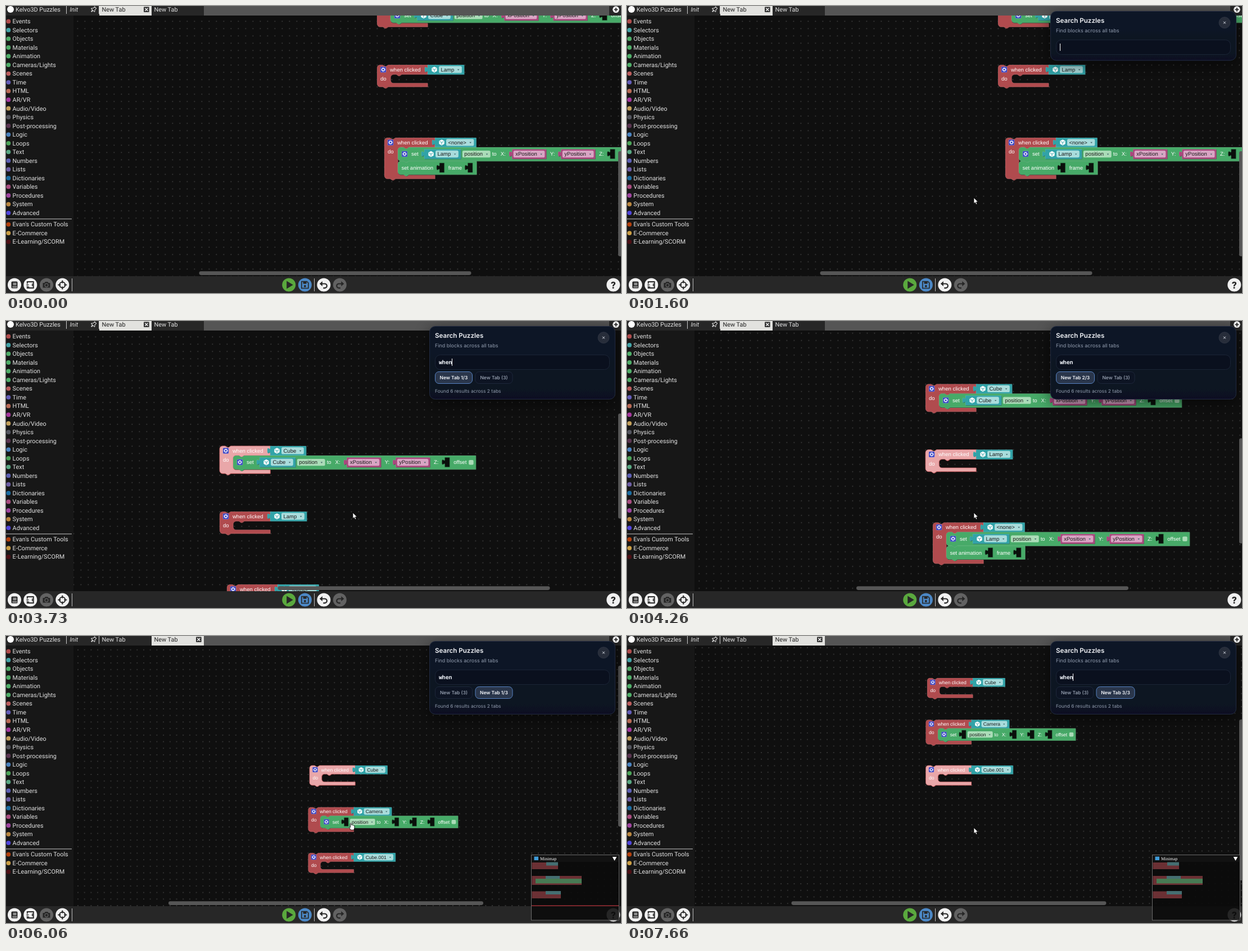
Recreate the animation shown at these times as an HTML page. Size 1094 by 512 pixels, loop 8000 ms.

```html
<!DOCTYPE html>
<html lang="en">
<head>
<meta charset="utf-8">
<title>Puzzle search</title>
<style>
html, body { margin: 0; width: 100%; height: 100%; overflow: hidden; background: #0f0f0f; }
svg { display: block; width: 100vw; height: 100vh; }
text { white-space: pre; text-rendering: geometricPrecision; }
.ui { font: 10.85px Roboto, sans-serif; fill: #e2e2e2; }
.blk { font: 9.53px "Liberation Sans", Arial, sans-serif; fill: #fff; }
.pane { font-family: Inter, sans-serif; }
.ink { fill: #1c1c1c; }
.body { stroke: #fff; stroke-opacity: .22; stroke-width: .5; }
.hot > .edge { fill: #b5484c; }
.hot > .body { fill: #e9a7a9; stroke: #cf6a6d; stroke-opacity: 1; stroke-width: .8; }
.hot > .call { fill: #faa294; stroke: #f0553c; }
</style>
</head>
<body>
<svg id="stage" viewBox="0 0 1094 512" preserveAspectRatio="none"></svg>
<script>
const RED = '#b04b4e', TEAL = '#31a3a8', GREEN = '#47aa68', PLUM = '#a9477d', DARK = '#272727';
const WORK = '#0f0f0f';

// Measured large so that hinting does not round the advances
const pen = document.createElement('canvas').getContext('2d');
pen.font = '953px "Liberation Sans", Arial, sans-serif';
const wide = s => pen.measureText(s).width / 100;

const rect = (x, y, w, h, fill, more = '') =>
  `<rect x="${x}" y="${y}" width="${w}" height="${h}" fill="${fill}" ${more}/>`;
const text = (x, y, s, more = '') =>
  `<text x="${x}" y="${y}" ${more}>${s.replace(/&/g, '&amp;').replace(/</g, '&lt;')}</text>`;
const disc = (x, y, r, fill, more = '') => `<circle cx="${x}" cy="${y}" r="${r}" fill="${fill}" ${more}/>`;
const path = (d, fill, more = '') => `<path d="${d}" fill="${fill}" ${more}/>`;
const line = (d, color, width, more = '') =>
  `<path d="${d}" fill="none" stroke="${color}" stroke-width="${width}" ${more}/>`;
const at = (x, y, body, more = '') => `<g transform="translate(${x} ${y})" ${more}>${body}</g>`;

// Puzzle blocks
const NOTCH = 'l3.9 2.6h2l3.9 -2.6';
const HCTON = 'l-3.9 2.6h-2l-3.9 -2.6';
const TOP = `M0 5.2A5.2 5.2 0 0 1 5.2 0H10${NOTCH}`;
const FOOT = `H19.8${HCTON}H5.2A5.2 5.2 0 0 1 0 `;
const HEAD = 16.9, EMPTY = 15.6, ARM = 6.5, GAP = .9;
const TALL = 24.7, SHORT = 24;

const shape = (d, fill, kind = '') =>
  path(d, fill, 'class="edge" transform="translate(.65 .65)"') +
  path(d, '#0006', 'transform="translate(.65 .65)"') +
  path(d, fill, `class="body ${kind}"`);

const plug = w =>
  `M${w} 0H0v3.25c0 6.5 -5.2 -5.2 -5.2 4.9s5.2 -1.6 5.2 4.9V${HEAD}H${w}Z`;

const gear = (x, y) => at(x, y,
  rect(-5, -5, 10, 10, '#3440c4', 'rx="1.5" stroke="#8d95e8" stroke-width=".5"') +
  disc(0, 0, 2.3, 'none', 'stroke="#fff" stroke-width="1.3"') +
  disc(0, 0, 3.3, 'none', 'stroke="#fff" stroke-width="1" stroke-dasharray="1.2 1.39"'));

const pill = (x, y, s, fill) => {
  const w = wide(s) + 17;
  return rect(x, y, w, 12.4, fill, 'rx="2.6"') + text(x + 3.5, y + 9.6, s, 'class="ink"') +
    path(`M${x + w - 8} ${y + 5.6}h3.6l-1.8 2.2Z`, '#3f6468');
};

const cubeIcon = path('M0 -5.2L4.7 -2.6V2.7L0 5.3L-4.7 2.7V-2.6Z', '#fff') +
  line('M-3.4 -1.7L0 .1L3.4 -1.7M0 .1V4', TEAL, 1);

const picker = (x, y, s) => {
  const w = wide(s) + 41;
  return { w, svg: at(x, y, shape(plug(w), TEAL) + at(12, 8.4, cubeIcon) + pill(20, 2.2, s, '#a9dcdc')) };
};
const variable = (x, y, s) => {
  const w = wide(s) + 22;
  return { w, svg: at(x, y, shape(plug(w), PLUM) + pill(2.5, 2.3, s, '#d9a5c4')) };
};
const slot = (x, y) => ({ w: 8.5, svg: at(x, y, path(plug(8.5), '#0a0f0b', 'stroke="#2c6b42" stroke-width=".6"')) });

const rowBox = (w, h, body) => ({ h, svg: shape(`${TOP}H${w}V${h}${FOOT}${h - 5.2}Z`, GREEN) + body });

function setRow(target, x1, y1) {
  let x = 24, out = gear(12, 12);
  const word = (s, gap) => { out += text(x, 15.6, s); x += wide(s) + gap; };
  const input = (make, s, gap) => { const b = make(x, 3.7, s); out += b.svg; x += b.w + gap; };
  word('set', 10.3);
  input(target ? picker : slot, target, 3);
  out += pill(x, 6, 'position', '#abdcb8');
  x += wide('position') + 20;
  word('to', 7);
  word('X:', 11.5);
  input(x1 ? variable : slot, x1, 7);
  word('Y:', 11);
  input(y1 ? variable : slot, y1, 7);
  word('Z:', 11.3);
  input(slot, '', 7);
  word('offset', 3.8);
  out += rect(x, 8, 8.5, 8.5, '#abdcb8', 'rx="2"');
  return rowBox(x + 12.5, target ? TALL : SHORT, out);
}

function animRow() {
  const a = 6.5 + wide('set animation') + 11, b = a + 15.5, c = b + wide('frame') + 10.5;
  return rowBox(c + 15.5, SHORT, text(6.5, 15.6, 'set animation') + slot(a, 3.5).svg +
    text(b, 15.6, 'frame') + slot(c, 3.5).svg);
}

function eventBlock(x, y, target, rows = [], scale = 1) {
  let m = HEAD, inside = '';
  for (const r of rows) {
    inside += at(24, m, r.svg);
    m += r.h;
  }
  m += rows.length ? GAP : EMPTY;
  const end = m + ARM, w = 90;
  const d = `${TOP}H${w}V${HEAD}H43.8${HCTON}H29.2a5.2 5.2 0 0 0 -5.2 5.2V${m - 5.2}` +
    `a5.2 5.2 0 0 0 5.2 5.2H${w}V${end}${FOOT}${end - 5.2}Z`;
  const inner = shape(d, RED) + gear(11, 8.4) + text(23, 11.7, 'when clicked') + text(6, 28.2, 'do') +
    picker(w, 0, target).svg + inside;
  return `<g class="item" transform="translate(${x} ${y}) scale(${scale})">${inner}</g>`;
}

function callBlock(x, y, s, fill) {
  const w = wide(s) + 13;
  return at(x, y, shape(`M0 3A3 3 0 0 1 3 0H10${NOTCH}H${w}V${HEAD}H19.8${HCTON}H3A3 3 0 0 1 0 14Z`, fill, 'call') +
    text(6, 12, s), 'class="item"');
}

const ORANGE = '#dc3503';
const worlds = [
  callBlock(-101, -115, 'Add Minimap', ORANGE) +
  callBlock(-88.5, -76, 'Improved Search (Per Tab Navigation, Clean & Fix...', ORANGE) +
  callBlock(-101, -37, 'Add Delete & Duplicate Shortcut', ORANGE) +
  callBlock(-101, 2, 'Add Menu', ORANGE) +
  callBlock(-114.5, 41, 'Enable Math Expression Input (Shift+C)', '#4787e2') +
  eventBlock(380, 223, 'Cube', [setRow('Cube', 'xPosition', 'yPosition')]) +
  eventBlock(380, 340, 'Lamp') +
  eventBlock(393, 470, '<none>', [setRow('Lamp', 'xPosition', 'yPosition'), animRow()]),
  eventBlock(540, 231, 'Cube', [], .9) +
  eventBlock(537.5, 305.5, 'Camera', [setRow()], .9) +
  eventBlock(537.5, 387, 'Cube.001', [], .9)
];

// Sidebar and bars
const topics = `Events b04c4c,Selectors 43a5a8,Objects 4fae68,Materials 4fae68,Animation 4fae68,Cameras/Lights 4fae68,
Scenes bb5c5c,Time 635db8,HTML b96a55,AR/VR a6389e,Audio/Video c3a05a,Physics 54565f,Post-processing 5a3550,
Logic 4a83c0,Loops 4ca458,Text 58a882,Numbers 5d60b5,Lists 6e5fa6,Dictionaries 1b6ea3,Variables a94d80,
Procedures a045a0,System b9863f,Advanced 5045dc,Evan's Custom Tools b3400d,E-Commerce cc9f44,E-Learning/SCORM 4d0f14`
  .split(/,\s*/).map(s => s.match(/(.*) (\w+)$/));

const sidebar = rect(0, 17, 120, 465, '#171717') + topics.map(([, name, color], i) => {
  const y = 27.4 + i * 15.53 + (i > 22 ? 5 : 0);
  return disc(4.4, y, 3.9, '#' + color) + text(11.6, y + 3.8, name);
}).join('') + rect(0, 379.4, 117, 1, '#c8c8c8');

const topBar = rect(0, 0, 1094, 17, '#555') + rect(0, 0, 352, 17, DARK) + rect(1073, 0, 21, 17, DARK) +
  disc(8, 6, 6, '#fff') + text(17, 9.8, 'Kelvo3D Puzzles') + text(113.5, 9.8, 'Init', 'font-style="italic"') +
  rect(107, 0, 1, 14, '#ccc') + rect(165, 0, 1, 14, '#ccc') +
  at(156, 6, path('M-2 -4.5h4v3.6l2 2.2v.9h-3.4v3.3h-1.2v-3.3h-3.4v-.9l2 -2.2Z', 'none',
    'stroke="#ddd" stroke-width="1" transform="rotate(45)"')) +
  disc(1085, 6.3, 5.8, '#fff') + line('M1081.6 6.3h6.8M1085 2.9v6.8', DARK, 1.8);

const tab = x => `<g class="tab">${rect(x, 0, 93, 17, DARK)}${text(x + 4.5, 9.8, 'New Tab')}
  <g class="shut">${rect(x + 79, 1.4, 9.6, 9.6, '#333', 'rx="1"')}
  ${line(`M${x + 81.3} 3.7l5 5m0 -5l-5 5`, '#fff', 1.3)}</g></g>`;

const button = (x, fill, icon) => at(x, 497.5, disc(0, 0, 12, fill) + icon);
const K = DARK, W = '#f1f1f1', G = '#626262';
const back = line('M-4 -2H1.5a4 3.8 0 0 1 0 7.6H-1', K, 2.2) + path('M-7.5 -2l5 -4.6v9.2Z', K);
const bottomBar = rect(0, 482, 1094, 30, DARK) +
  button(15, W, rect(-5.5, -6, 11, 12, K, 'rx="1.5"') + rect(-2.5, -3.4, 6, 1.2, W) + rect(-2.5, -.8, 6, 1.2, W) + rect(-3.6, 3, 8, 1.2, W)) +
  button(43.3, W, line('M-5.5 -2V-5.5H5.5V5.5H-5.5V2', K, 1.8) + line('M-3 5.5v-3M3.5 -2.5v5M-7 0h4', K, 1.5)) +
  button(72, G, path('M-6.5 -3.5h3l1.2 -2h4.6l1.2 2h3v8.5h-13Z', K) + disc(0, .6, 3, K, `stroke="${G}" stroke-width="1.2"`)) +
  button(100.3, W, disc(0, 0, 5, 'none', `stroke="${K}" stroke-width="2"`) + line('M0 -8v5M0 8v-5M-8 0h5M8 0h-5', K, 2)) +
  rect(117, 486, 1, 23, '#bbb') +
  button(503.2, '#5aa83e', path('M-4 -7L7.5 0L-4 7Z', K)) +
  button(531.8, '#4c88c6', line('M-6 -6H3.5L6 -3.5V6H-6Z', K, 1.6) + rect(-3.2, -5.5, 6, 3.6, K) + disc(0, 2.2, 2, K)) +
  rect(548, 486, 1, 23, '#bbb') +
  button(565.3, W, back) +
  button(593.8, G, `<g transform="scale(-1 1)">${back}</g>`) +
  button(1080.3, W, text(0, 6.2, '?', `style="fill:${K};font-weight:900;font-size:17px" text-anchor="middle"`));

const panel = `<g id="panel" class="pane">
  <rect id="card" x="753.5" y="9.5" width="330" rx="10" fill="url(#navy)" stroke="#222c40" filter="url(#drop)"/>
  ${text(763, 29.8, 'Search Puzzles', 'font-size="11.6" font-weight="600" fill="#f3f5f9"')}
  ${text(763, 46.6, 'Find blocks across all tabs', 'font-size="9" fill="#929daf"')}
  ${disc(1063, 29.7, 10, '#272d3a', 'stroke="#353c4a" stroke-width=".7"')}
  ${line('M1061 27.7l4 4m0 -4l-4 4', '#d5dae2', 1)}
  ${rect(763.5, 60.5, 310, 26, '#0a101e', 'rx="9" stroke="#1b2436"')}
  <text id="query" x="770" y="77" font-size="9.75" font-weight="600" fill="#eef2f8" style="font-family:'Noto Sans Mono','DejaVu Sans Mono',monospace"></text>
  <rect id="caret" y="67" width="1" height="13" fill="#fff"/>
  <g id="found" font-size="8.45">
    ${[0, 1].map(() => '<g class="chip"><rect y="90.5" height="21" rx="6.5"/><text y="104.1" text-anchor="middle"></text></g>').join('')}
    <text id="count" x="763" y="128.2" fill="#929daf"></text>
  </g></g>`;

const mini = (y, w, h, tx, th) => rect(935.5, y, w, h, '#6b3034') + rect(tx, y - .5, 935.5 + w - tx, th, '#456e71');
const minimap = `<g id="mini">
  ${rect(934.5, 390.5, 156, 116.5, '#0b0b0b', 'fill-opacity=".88" stroke="#6a6a6a"')}
  ${rect(935, 391, 155, 12, '#121212')}
  ${rect(939.5, 393.5, 7.5, 6.5, '#3f9bd8')}
  ${text(950, 400, 'Minimap', 'style="font:8px \'Liberation Serif\',serif" fill="#fff"')}
  ${path('M1078.7 394h7.6l-3.8 7Z', '#fff')}
  ${mini(404, 46.5, 12, 961, 6)}
  ${rect(935.5, 428, 88.5, 16, '#6b3034') + rect(960, 428, 25, 6, '#456e71') + rect(942, 433, 82, 8.3, '#477a53')}
  ${mini(455.5, 51.5, 12.5, 960, 6)}
  <rect id="edge" x="935" y="480.5" width="155" height="1.4" fill="#a8323a"/></g>`;

const arrow = path('M0 0V10.4L2.4 8.2L4 12L5.8 11.2L4.2 7.6H7.4Z', '#fff', 'stroke="#000" stroke-width=".7"');
const hand = path('M-2 6.5L-4.8 2.2Q-4.6 .6 -2.8 2V-5Q-2 -6.8 -1 -5V-2.2Q0 -3.6 1 -2Q2 -3 2.9 -1.6Q4.3 -2.2 4.6 -.6V3L3.4 6.5Z',
  '#fff', 'stroke="#000" stroke-width=".8"');

document.getElementById('stage').innerHTML = `
<defs>
  <pattern id="grid" patternUnits="userSpaceOnUse"><rect id="dot" width="1.4" height="1.4" fill="#525252"/></pattern>
  <linearGradient id="navy" x2="0" y2="1"><stop stop-color="#101828"/><stop offset="1" stop-color="#0a1120"/></linearGradient>
  <filter id="drop" x="-20%" y="-40%" width="140%" height="200%"><feDropShadow dx="0" dy="7" stdDeviation="14" flood-color="#000" flood-opacity=".55"/></filter>
  <clipPath id="view"><rect x="120" y="17" width="974" height="465"/></clipPath>
</defs>
${rect(0, 0, 1094, 512, WORK)}
${rect(120, 17, 974, 465, 'url(#grid)')}
<g clip-path="url(#view)" class="blk">${worlds.map(w => `<g class="world">${w}</g>`).join('')}</g>
<rect id="hbar" y="473.3" height="6.6" rx="3.3" fill="#565656"/>
<rect id="vbar" x="1089" width="6.6" rx="3.3" fill="#565656"/>
<g class="ui">${sidebar}${topBar}${tab(166)}${tab(259)}${bottomBar}</g>
${panel}${minimap}
<g id="arrow">${arrow}</g><g id="hand" transform="translate(615.3 339.5)">${hand}</g>`;

// Timeline
const $ = id => document.getElementById(id);
const all = s => [...document.querySelectorAll(s)];
const set = (el, o) => { for (const k in o) el.setAttribute(k, o[k]); };
const show = (el, on) => { el.style.display = on ? '' : 'none'; };
const last = (list, t) => list.filter(e => e[0] <= t).pop();

// time, tab, shift x, shift y, lit block, hit number
const views = [
  [0, 0, 280, -235, -1, 0],
  [2200, 0, 676, 356, 0, 1],
  [2460, 0, 0, 0, 5, 1],
  [3860, 0, 151, -110.5, 6, 2],
  [4390, 0, -14, -258, 7, 3],
  [5520, 1, 0, 0, -1, 1],
  [5590, 1, 0, 0, 0, 1],
  [6460, 1, -62, -78.5, 1, 2],
  [7190, 1, -6, -156, 2, 3]
];
const scenes = [
  { step: 13, ox: 380.3, oy: 223.3, h0: 483.5, hk: .5, hw: 484, v0: 165, vk: .4, vh: 187.5 },
  { step: 11.7, ox: 537.5, oy: 305.5, h0: 289, hk: .58, hw: 560, v0: 53, vk: .615, vh: 287 }
];
const typed = [[0, ''], [2200, 'w'], [2460, 'wh'], [2530, 'whe'], [2660, 'when']];
const blinks = [1600, 2130, 2200, 3190, 3730, 4260, 4790, 5320, 5520, 6060, 6590, 7120, 7660];

const glide = (times, [x0, y0], [x1, y1], ease) => times.map((t, i) => {
  const k = ease(i / (times.length - 1));
  return [t, x0 + (x1 - x0) * k, y0 + (y1 - y0) * k];
});
const mouse = [
  ...glide([120, 190, 260, 330, 390, 460, 520], [1004, 493], [647, 375], k => 1 - (1 - k) ** 2),
  [660, 640, 367], [730, 647, 372],
  ...glide([930, 1000, 1130, 1200], [642, 367], [617, 342], k => k * (2 - k))
];

const worldEls = all('.world'), tabs = all('.tab'), chips = all('.chip');
const items = worldEls.map(w => [...w.children]);

function drawPanel(t, view, tabNow) {
  const query = last(typed, t)[1], hits = t < 2460 ? 8 : 3;
  show($('panel'), t >= 1600);
  show($('found'), query);
  $('card').setAttribute('height', query ? 130 : 87.5);
  $('query').textContent = query;
  $('caret').setAttribute('x', 770 + query.length * 5.85 - (query ? .4 : 0));
  show($('caret'), blinks.filter(b => b <= t).length % 2);
  $('count').textContent = `Found ${hits + 3} results across 2 tabs`;
  let x = 763.5;
  chips.forEach((chip, i) => {
    const on = i === tabNow, [box, label] = chip.children;
    const w = on && view[5] > 1 ? 68 : 66;
    set(box, { x, width: w, fill: on ? '#2a364b' : '#0d1423', stroke: on ? '#5783c4' : '#1d273a' });
    set(label, { x: x + w / 2, fill: on ? '#f4f7fb' : '#a2acbc', 'font-weight': on ? 600 : 500 });
    label.textContent = on ? `New Tab ${view[5]}/${hits}` : 'New Tab (3)';
    x += w + 5.5;
  });
}

function draw(t) {
  const view = last(views, t), [, now, dx, dy, lit] = view, s = scenes[now];
  worldEls.forEach((w, i) => {
    show(w, i === now);
    w.setAttribute('transform', `translate(${dx} ${dy})`);
    items[i].forEach((b, j) => b.classList.toggle('hot', i === now && j === lit));
  });
  const half = s.step / 2;
  set($('grid'), { x: s.ox + dx - half, y: s.oy + dy - half, width: s.step, height: s.step });
  set($('dot'), { x: half - .7, y: half - .7 });
  set($('hbar'), { x: s.h0 - dx * s.hk, width: s.hw });
  set($('vbar'), { y: s.v0 - dy * s.vk, height: s.vh });
  tabs.forEach((g, i) => {
    g.children[0].setAttribute('fill', i === now ? '#e2e2df' : DARK);
    g.children[1].style.fill = i === now ? '#222' : '#e2e2e2';
    show(g.children[2], i === now);
  });
  drawPanel(t, view, now);
  show($('mini'), t >= 5590);
  show($('edge'), t < 6460);
  const m = last(mouse, t), grab = t >= 5520 && t < 6460;
  show($('hand'), grab);
  show($('arrow'), m && !grab);
  if (m) $('arrow').setAttribute('transform', `translate(${m[1]} ${m[2]})`);
}

const start = performance.now();
function tick() {
  draw((performance.now() - start) % 8000);
  requestAnimationFrame(tick);
}
tick();
</script>
</body>
</html>
```
